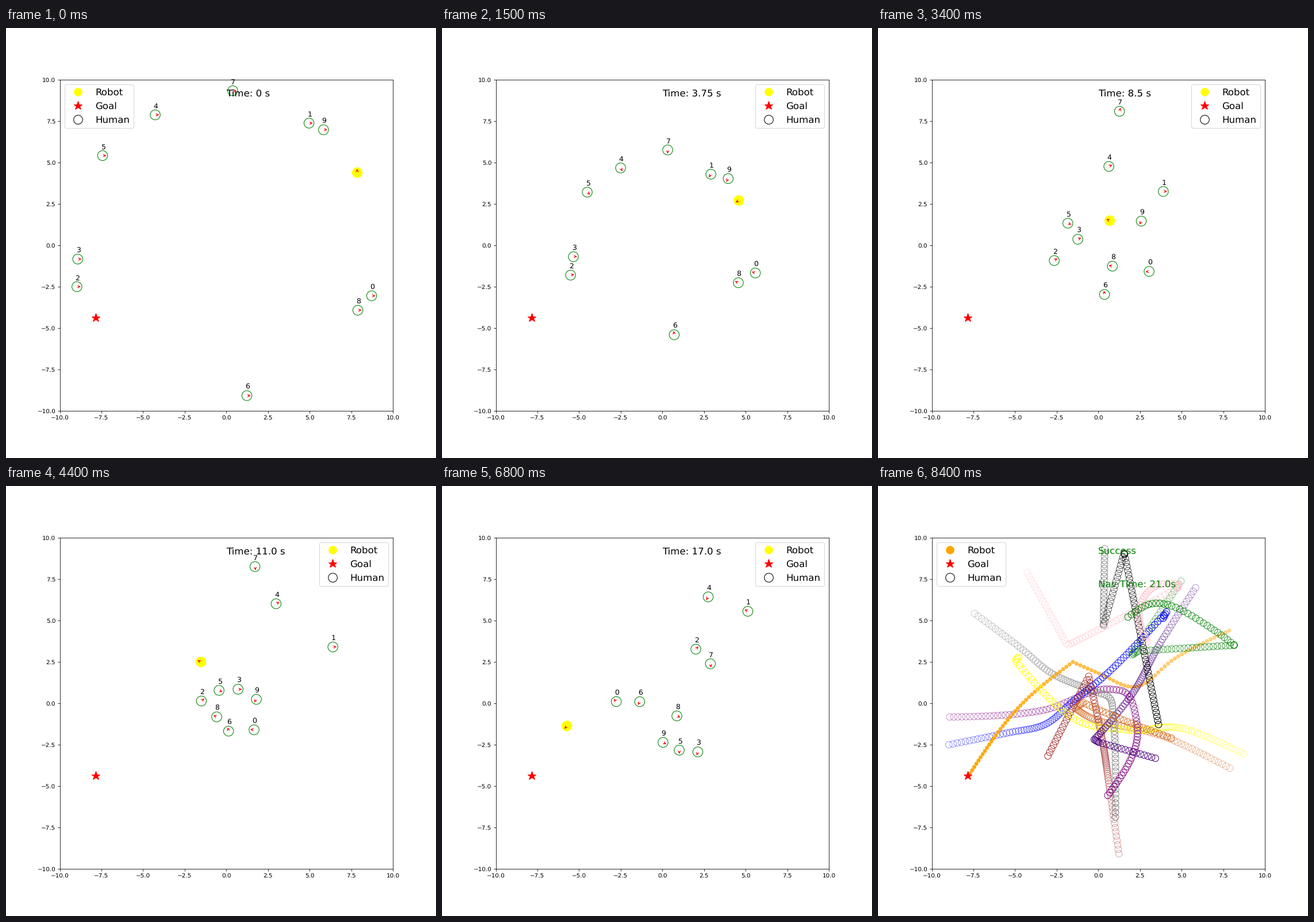
Write a matplotlib script that moves like this. It is 748 by 748 pixels and loops after 8.5 s.

```python
import numpy as np
import matplotlib.pyplot as plt
from matplotlib.animation import FuncAnimation
from matplotlib.collections import PatchCollection
from matplotlib.colors import to_rgba
from matplotlib.lines import Line2D
from matplotlib.patches import ArrowStyle, Circle, FancyArrowPatch

plt.rcParams['text.hinting'] = 'no_hinting'

STEPS = 84          # simulated states; one summary frame follows
DT = 0.25
R = 0.3

# Each agent: trail colour and a few key points (step, x, y); the robot is first
AGENTS = [
    ('orange', [(0, 7.85, 4.38), (15, 4.59, 2.7), (27, 2.2, 0.98),
                (37, 0.02, 1.8), (44, -1.53, 2.49), (59, -4.34, 0.2),
                (83, -7.7, -4.25)]),
    ('yellow', [(0, 8.72, -3.06), (15, 5.58, -1.68), (44, 1.66, -1.61),
                (59, -1.13, -1.12), (80.5, -5, 2.59), (83, -4.79, 2.77)]),
    ('green', [(0, 4.96, 7.37), (20, 2.23, 3.26), (24, 2.02, 2.91),
               (28, 2.4, 3.15), (51, 8.14, 3.5), (54, 8.14, 3.51),
               (60, 6.96, 4.4), (77, 3.02, 5.96), (83, 1.78, 5.2)]),
    ('blue', [(0, -8.97, -2.51), (15, -5.51, -1.81), (30, -3.15, -1.26),
              (44, -1.5, 0.13), (59, 0.57, 1.83), (80, 4.09, 5.51),
              (83, 3.89, 5.13)]),
    ('purple', [(0, -8.92, -0.84), (24, -3.32, -0.43), (44, 0.7, 0.84),
                (49, 1.61, 0.65), (59, 2.32, -1.29), (83, 0.57, -5.57)]),
    ('pink', [(0, -4.27, 7.87), (20.5, -1.86, 3.49), (24, -1.31, 3.76),
              (51, 4.75, 6.95), (55, 4.82, 7.2), (59, 3.94, 7.21),
              (68, 2.75, 6.42), (75, 2.44, 5.2), (83, 2.92, 3.71)]),
    ('gray', [(0, -7.43, 5.41), (15, -4.51, 3.2), (24, -3.22, 2.09),
              (44, -0.44, 0.77), (52, 0.71, 0.27), (59, 0.89, -0.89),
              (83, 1.02, -6.88)]),
    ('brown', [(0, 1.23, -9.09), (15, 0.71, -5.41), (44, 0.13, -1.69),
               (61, -0.58, 1.62), (83, -3.03, -3.19)]),
    ('black', [(0, 0.38, 9.33), (19.7, 0.3, 4.63), (38, 1.54, 9.05),
               (41, 1.57, 8.98), (83, 3.61, -1.29)]),
    ('chocolate', [(0, 7.89, -3.93), (15, 4.56, -2.27), (44, -0.58, -0.83),
                   (53, -1.39, -0.29), (59, -0.91, 0.03), (68, 0.87, -0.77),
                   (83, 4.37, -2.11)]),
    ('indigo', [(0, 5.83, 6.97), (15, 3.95, 4.02), (44, 1.8, 0.23),
                (59, 0.11, -1.81), (63, -0.25, -2.2), (68, 0.04, -2.37),
                (83, 3.42, -3.33)]),
]


def make_path(keys):
    """Cubic curve through the keys; sharp turns and stops stay corners."""
    keys = np.array(keys, float)
    t, p = keys[:, 0], keys[:, 1:]
    h = np.diff(t)
    v = np.diff(p, axis=0) / h[:, None]

    def joint(i):
        """Velocity at an inner key, or None at a corner or an end."""
        if not 0 < i < len(t) - 1:
            return None
        a, b = v[i - 1], v[i]
        if a @ b < 0.45 * max(a @ a, b @ b):
            return None
        return (h[i - 1] * b + h[i] * a) / (h[i - 1] + h[i])

    path = []
    for k in range(STEPS):
        i = min(np.searchsorted(t, k, side='right') - 1, len(h) - 1)
        m0, m1 = joint(i), joint(i + 1)
        if m0 is None:
            m0 = v[i] if m1 is None else 1.5 * v[i] - 0.5 * m1
        if m1 is None:
            m1 = 1.5 * v[i] - 0.5 * m0
        u = (k - t[i]) / h[i]
        bow = u * (1 - u) * ((1 - u) * (m0 - v[i]) - u * (m1 - v[i]))
        path.append(p[i] + h[i] * (u * v[i] + bow))
    return np.array(path)


def make_heading(path, first):
    d = np.diff(path, axis=0)
    return np.concatenate([[first], np.arctan2(d[:, 1], d[:, 0])])


colors = [c for c, _ in AGENTS]
paths = [make_path(keys) for _, keys in AGENTS]
headings = [make_heading(p, 0 if i else np.pi / 2) for i, p in enumerate(paths)]

fig, ax = plt.subplots(figsize=(10, 10), dpi=74.8)
ax.set_xlim(-10, 10)
ax.set_ylim(-10, 10)

goal = Line2D([-paths[0][0, 0]], [-paths[0][0, 1]], color='red', marker='*',
              linestyle='None', markersize=15)
ax.add_line(goal)


def key(face, edge, marker='o'):
    return Line2D([], [], linestyle='None', marker=marker, markersize=15,
                  markerfacecolor=face, markeredgecolor=edge)


legend = ax.legend([key('yellow', 'white'), key('red', 'red', '*'),
                    key('white', 'black')],
                   ['Robot', 'Goal', 'Human'], fontsize=16, loc='upper left')

bodies = [Circle(paths[0][0], R, color='yellow')]
bodies += [Circle(p[0], R, fill=False, edgecolor='green') for p in paths[1:]]
style = ArrowStyle('->', head_length=4, head_width=2)
arrows = [FancyArrowPatch((0, 0), (1, 0), color='red', arrowstyle=style)
          for _ in paths]
for patch in bodies + arrows:
    ax.add_patch(patch)

numbers = [ax.text(0, 0, str(i), fontsize=12) for i in range(len(paths) - 1)]
clock = ax.text(0, 9, '', fontsize=16)
summary = [ax.text(0, 9, 'Success', fontsize=16, color='green'),
           ax.text(0, 7, f'Nav Time: {STEPS * DT}s', fontsize=16, color='green')]


def make_trails():
    dots, edges, faces = [], [], []
    for k in range(STEPS):
        alpha = 0.4 + 0.6 * k / (STEPS - 1)
        for i, path in enumerate(paths):
            dots.append(Circle(path[k], 0.2 if i else 0.1))
            edges.append(to_rgba(colors[i], alpha))
            faces.append((0, 0, 0, 0) if i else edges[-1])
    return PatchCollection(dots, edgecolors=edges, facecolors=faces,
                           linewidths=1)


trails = ax.add_collection(make_trails(), autolim=False)


def update(k):
    done = k == STEPS
    for artist in bodies + arrows + numbers + [clock]:
        artist.set_visible(not done)
    for artist in summary + [trails]:
        artist.set_visible(done)
    legend.set_loc('upper left' if k == 0 or done else 'upper right')
    legend.legend_handles[0].set_markerfacecolor('orange' if done else 'yellow')
    if done:
        return []

    for i, path in enumerate(paths):
        x, y = path[k]
        a = headings[i][k]
        bodies[i].center = x, y
        arrows[i].set_positions((x, y), (x + R * np.cos(a), y + R * np.sin(a)))
        if i:
            numbers[i - 1].set_position((x - 0.1, y + 0.4))
    clock.set_text(f'Time: {k * DT if k else 0} s')
    return []


anim = FuncAnimation(fig, update, frames=STEPS + 1, init_func=lambda: update(0),
                     interval=100, repeat=True, repeat_delay=0, blit=False)
plt.show()
```
